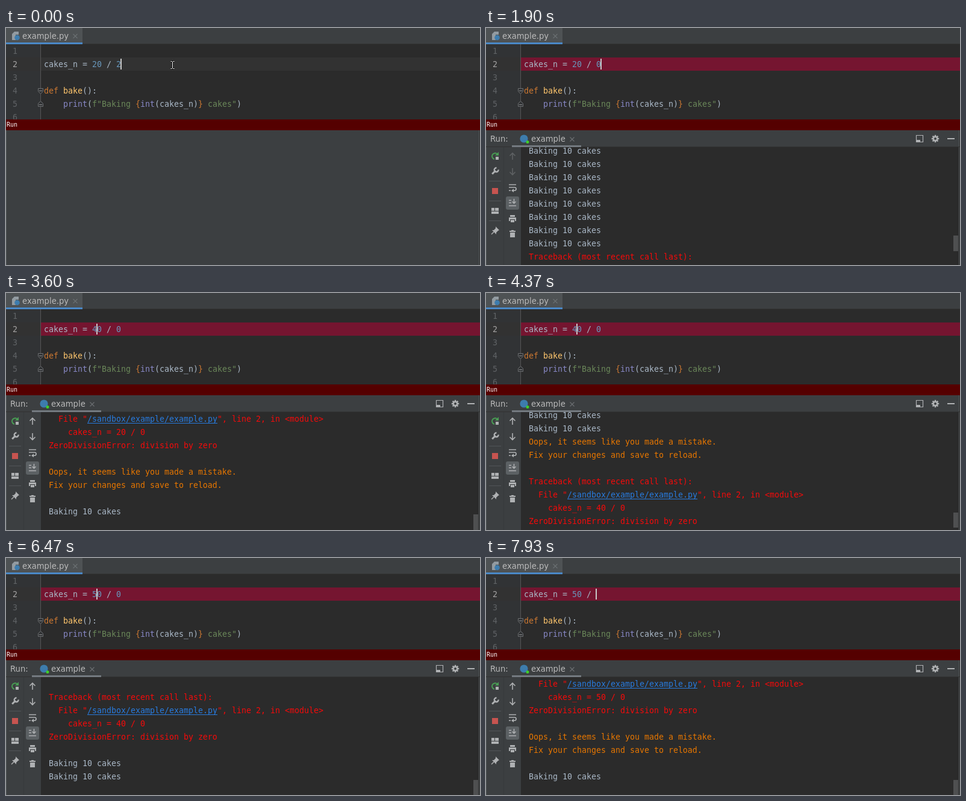
An HTML page with a canvas that plays this animation: 787 px wide and 394 px high, repeating every 8 s.

```html
<!DOCTYPE html>
<html lang="en">
<head>
<meta charset="utf-8">
<title>Live reload in an editor</title>
<style>
html, body { margin: 0; width: 100%; height: 100%; overflow: hidden; background: #3c3f41; }
canvas { display: block; }
</style>
</head>
<body>
<canvas id="stage" width="787" height="394"></canvas>
<script>
const ctx = document.getElementById('stage').getContext('2d');
const LOOP = 8000, CHAR = 8, LINE = 22;
const MONO = '13.29px "DejaVu Sans Mono", monospace';
const sans = size => `${size}px "DejaVu Sans", sans-serif`;
const C = {
  panel: '#3c3f41', editor: '#2b2b2b', text: '#a9b7c6', number: '#6897bb', keyword: '#cc7832',
  builtin: '#8888c6', string: '#6a8759', func: '#ffc66d', icon: '#afb1b3', dim: '#5e6163',
  red: '#f50a0a', orange: '#e67600', link: '#287bde', wave: '#bc3f3c', logo: '#3d7cad'
};

// Editor states: start, right side of the assignment, caret column (-1 hides it)
const edits = [
  [0, '20 / 2', 16], [330, '20 / ', 15], [800, '20 / 0', 16], [2330, '20 / 0', 15],
  [2500, '20 / 0', 13], [2700, '20 / 0', 12], [2930, '20 / 0', 11], [3170, '0 / 0', 10],
  [3600, '40 / 0', 11], [4770, '40 / 0', -1], [5300, '40 / 0', 11], [5670, '40 / 0', 12],
  [5900, '40 / 0', 11], [6130, '0 / 0', 10], [6470, '50 / 0', 11], [7700, '50 / 0', 13],
  [7800, '50 / 0', 16], [7930, '50 / ', 15]
];

// Console output
const bake = [['Baking 10 cakes', C.text]];
const trace = n => [
  ['Traceback (most recent call last):', C.red],
  ['  File "', C.red, '/sandbox/example/example.py', C.link, '", line 2, in <module>', C.red],
  [`    cakes_n = ${n} / 0`, C.red],
  ['ZeroDivisionError: division by zero', C.red], []
];
const advice = [
  ['Oops, it seems like you made a mistake.', C.orange],
  ['Fix your changes and save to reload.', C.orange], []
];
const output = [{ at: 0, lines: Array(57).fill(bake[0]) }];
for (let at = 900; at < LOOP; at += 1000) output.push({ at, lines: bake });
output.push(
  { at: 1900, steps: 4, lines: [...trace(20), ...advice] },
  { at: 4300, steps: 3, lines: [...advice, ...trace(40)] },
  { at: 7270, steps: 4, lines: [...trace(50), ...advice] }
);
output.sort((a, b) => a.at - b.at);

function rect(x, y, w, h, color) {
  ctx.fillStyle = color;
  ctx.fillRect(x, y, w, h);
}
function text(str, x, y, color, font = MONO) {
  ctx.font = font;
  ctx.fillStyle = color;
  ctx.fillText(str, x, y);
}
function runs(parts, x, y) {
  for (let i = 0; i < parts.length; i += 2) {
    const [str, color] = [parts[i], parts[i + 1]], width = str.length * CHAR;
    text(str, x, y, color);
    if (color === C.link) rect(x, y + 2, width, 1, color);
    x += width;
  }
}
function path(d, color, width = 1.6) {
  ctx.strokeStyle = color;
  ctx.lineWidth = width;
  ctx.stroke(new Path2D(d));
}
function shape(d, color) {
  ctx.fillStyle = color;
  ctx.fill(new Path2D(d));
}
function dot(x, y, r, color) {
  ctx.fillStyle = color;
  ctx.beginPath();
  ctx.arc(x, y, r, 0, 7);
  ctx.fill();
}
const cross = (x, y) => path(`M${x - 3.5} ${y - 3.5}l7 7m0 -7l-7 7`, '#6c7073', 1.1);
function wave(x, end, y) {
  let d = `M${x} ${y + 2}`;
  for (let up = true; x < end; x += 2, up = !up) d += up ? 'l2 -2' : 'l2 2';
  path(d, C.wave, 1);
}

function drawTab(t) {
  rect(0, 0, 787, 26, C.panel);
  rect(0, 26, 787, 1, '#323232');
  rect(0, 0, 127, 24, '#4e5254');
  rect(0, 24, 127, 3, '#4a88c7');
  shape('M14 6h7v5h-5v9h-6v-10z', '#929ba1');
  dot(18.5, 16, 4.3, C.logo);
  text('example.py', 27, 18, '#bbbbbb', sans(13.2));
  if (t >= 770 && t < 1170) wave(27, 104, 20);
  cross(115, 13.5);
}

function drawEditor(t) {
  const [, value, caret] = edits.findLast(e => e[0] <= t);
  rect(0, 27, 787, 125, C.editor);
  rect(0, 27, 57, 125, '#313335');
  rect(0, 49, 787, LINE, '#323232');
  if (t >= 1870) rect(58, 49, 729, LINE, '#751530');
  rect(57, 27, 1, 125, '#555555');
  for (let i = 0; i < 6; i++) text(i + 1, 11, 43 + i * LINE, i === 1 ? '#a4a3a3' : '#606366');

  const fold = 'M53.5 100.5h8v5l-4 4l-4 -4z', foldEnd = 'M53.5 130.5h8v-5l-4 -4l-4 4z';
  for (const d of [fold, foldEnd]) {
    shape(d, '#313335');
    path(d, '#6c6e70', 1);
  }
  rect(55, 104, 5, 1, '#8a8c8e');
  rect(55, 127, 5, 1, '#8a8c8e');

  runs(['cakes_n = ', C.text], 63, 65);
  [...value].forEach((ch, i) => text(ch, 143 + i * CHAR, 65, ch === '/' ? C.text : C.number));
  runs(['def ', C.keyword, 'bake', C.func, '():', C.text], 63, 109);
  runs(['print', C.builtin, '(', C.text, 'f"Baking ', C.string, '{', C.keyword, 'int', C.builtin,
    '(cakes_n)', C.text, '}', C.keyword, ' cakes"', C.string, ')', C.text], 95, 131);

  if (t >= 730 && t < 1270) wave(175, 183, 68);
  if (caret >= 0) rect(62 + caret * CHAR, 51, 2, 18, '#c8c8c8');
  if (t < 270) {
    const beam = 'M273.5 55.5h2l1 1l1 -1h2m-3 1v10m-3 1h2l1 -1l1 1h2';
    path(beam, '#111111', 3);
    path(beam, '#ffffff', 1);
  }
}

function drawHeader() {
  text('Run:', 7, 189, '#bbbbbb', sans(13.2));
  dot(63, 184, 6.6, C.logo);
  dot(69, 189.5, 2.5, '#3fcf2a');
  text('example', 75, 189, '#bbbbbb', sans(13.2));
  cross(143, 185);
  rect(0, 197, 787, 1, '#323232');
  rect(43, 195, 115, 3, '#747a80');
  path('M714.5 178.5h11v11h-11z', C.icon, 1.2);
  rect(715, 186, 6, 3, C.icon);
  for (let i = 0; i < 8; i++) {
    const a = i * Math.PI / 4, x = Math.cos(a), y = Math.sin(a);
    path(`M${746 + 3 * x} ${184 + 3 * y}L${746 + 6.2 * x} ${184 + 6.2 * y}`, C.icon, 2.4);
  }
  dot(746, 184, 4.6, C.icon);
  dot(746, 184, 2, C.panel);
  rect(766, 183, 12, 2, C.icon);
}

function drawTools(t) {
  const arrows = t >= 2230 ? C.icon : C.dim;
  rect(29, 198, 1, 196, '#37393b');
  for (const y of [254, 287, 320]) rect(5, y, 20, 1, '#515558');

  path('M18.5 209.5A5 5 0 1 0 14 218', '#499c54', 2);
  shape('M21 206v6h-6z', '#499c54');
  rect(16, 214, 5, 5, C.icon);
  path('M10.2 242.8L16 237', C.icon, 3);
  path('M20.5 235.5A3.4 3.4 0 1 1 17.5 232.5', C.icon, 2.4);
  rect(10, 266, 10, 10, '#c75450');
  rect(9, 299, 5, 5, C.icon);
  rect(15, 299, 6, 5, C.icon);
  rect(9, 305, 12, 4, C.icon);
  shape('M16 330l6 6l-2 1l-3 3l0 3l-7 -7l3 0l3 -3z', C.icon);
  path('M13 339l-4 4', C.icon, 1.5);

  path('M44 219v-11m-4.5 4.5l4.5 -4.5l4.5 4.5', arrows);
  path('M44 233v11m-4.5 -4.5l4.5 4.5l4.5 -4.5', arrows);
  path('M38 260.5h12M38 265h9.5a2.6 2.6 0 0 1 0 5.2h-3M38 270.2h3', C.icon);
  shape('M46 267.2v6l-4 -3z', C.icon);
  ctx.fillStyle = '#5c6164';
  ctx.beginPath();
  ctx.roundRect(33, 280, 22, 22, 3);
  ctx.fill();
  path('M38 286.5h4M38 290.5h4M38 295.5h12M46.5 284v7m-3 -2.5l3 3l3 -3', C.icon, 1.5);
  rect(40, 311, 8, 3, C.icon);
  shape('M38 315h12v6h-2v-3h-8v3h-2z', C.icon);
  rect(41, 319, 6, 4, C.icon);
  rect(39, 337, 10, 2, C.icon);
  rect(42, 336, 4, 1, C.icon);
  shape('M40 340h8v8h-8z', C.icon);
}

// Pixels still to scroll after a block of output arrives
function remaining(t, { at, steps, lines }) {
  if (!steps) return 0;
  const step = Math.floor((t - at + 5) / 33.3);
  const x = Math.min(1, 0.1 + 0.9 * step / steps);
  return Math.round(lines.length * LINE * (1 - x * x * (3 - 2 * x)));
}

function drawConsole(t) {
  const shown = output.filter(o => o.at <= t);
  const lines = shown.flatMap(o => o.lines);
  const rest = remaining(t, shown[shown.length - 1]);
  ctx.save();
  ctx.beginPath();
  ctx.rect(58, 198, 727, 196);
  ctx.clip();
  rect(58, 198, 727, 196, C.editor);
  lines.forEach((line, i) => {
    const y = 368 - (lines.length - 1 - i) * LINE + rest;
    if (y > 195 && y < 410) runs(line, 71, y);
  });
  const total = lines.length * LINE, size = Math.max(25, 196 * 196 / total);
  const top = 198 + (196 - size) * (1 - rest / (total - 196));
  rect(776, Math.round(top), 8, Math.round(size), '#4f5051');
  ctx.restore();
}

function draw(t) {
  drawTab(t);
  drawEditor(t);
  rect(0, 152, 787, 18, '#550000');
  text('Run', 1, 164, '#ffffff', '10px "DejaVu Sans Mono", monospace');
  rect(0, 170, 787, 224, C.panel);
  rect(0, 170, 1, 224, '#515658');
  rect(785, 170, 1, 224, '#515658');
  if (t >= 70) {
    drawHeader();
    drawTools(t);
    drawConsole(t);
  }
  rect(786, 170, 1, 224, C.editor);
}

const start = performance.now();
function tick() {
  draw((performance.now() - start) % LOOP);
  requestAnimationFrame(tick);
}
tick();
</script>
</body>
</html>
```
